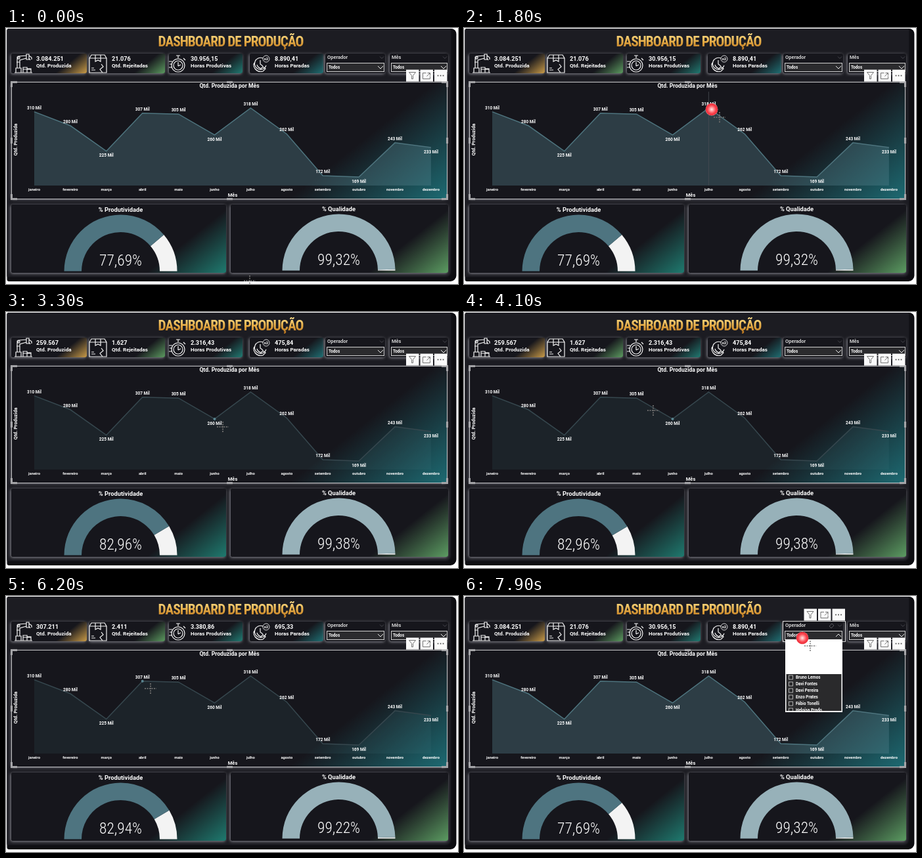
Recreate the animation shown at these times as an HTML page with a canvas. Size 688 by 390 pixels, loop 8000 ms.

```html
<!DOCTYPE html>
<html lang="pt">
<head>
<meta charset="utf-8">
<title>Dashboard de Produção</title>
<style>
html, body { margin: 0; width: 100%; height: 100%; overflow: hidden; background: #fff; }
canvas { display: block; width: 688px; height: 390px; }
</style>
</head>
<body>
<canvas id="stage"></canvas>
<script>
const canvas = document.getElementById('stage');
const g = canvas.getContext('2d');
const dpr = window.devicePixelRatio || 1;
canvas.width = 688 * dpr;
canvas.height = 390 * dpr;

const LOOP = 8000;
const SANS = 'Roboto, sans-serif';
const NARROW = '"Roboto Condensed", "Liberation Sans Narrow", "Open Sans Condensed", Roboto, sans-serif';
const MONTHS = ['janeiro', 'fevereiro', 'março', 'abril', 'maio', 'junho', 'julho',
  'agosto', 'setembro', 'outubro', 'novembro', 'dezembro'];
const VALUES = [310, 280, 225, 307, 305, 260, 318, 262, 172, 169, 243, 233];
const BELOW = [2, 5, 9, 11];
const PEOPLE = ['Bruno Lemos', 'Davi Fontes', 'Davi Pereira', 'Enzo Prates', 'Fábio Tonelli', 'Heloísa Prado'];
const px = i => 43 + 54.9 * i;
const py = i => 122 + (318 - VALUES[i]) * 0.705;

// click time, selected month, four indicators, two percentages
const TOTAL = ['3.084.251', '21.076', '30.956,15', '8.890,41', 77.69, 99.32];
const STATES = [
  [-1000, -1, ...TOTAL],
  [1780, 6, '317.987', '2.315', '3.266,55', '847,22', 79.41, 99.28],
  [2800, 5, '259.567', '1.627', '2.316,43', '475,84', 82.96, 99.38],
  [4600, 4, '305.410', '1.592', '2.945,60', '519,13', 85.02, 99.48],
  [5500, 3, '307.211', '2.411', '3.380,86', '695,33', 82.94, 99.22],
  [6700, -1, ...TOTAL]
];
const OPEN = 7880;
const CLICKS = [...STATES.slice(1).map(s => s[0]), OPEN];

// time, x, y of the crosshair
const PATH = [
  [0, 371, 385], [900, 396, 214], [1700, 389, 136], [1950, 389, 136], [2400, 346, 171],
  [2750, 330, 175], [3600, 330, 175], [4100, 288, 150], [4400, 275, 143], [4750, 275, 143],
  [5200, 227, 145], [5450, 220, 141], [6200, 220, 141], [6700, 242, 121], [6950, 242, 121],
  [7750, 527, 76], [8000, 527, 76]
];
const smooth = k => k * k * (3 - 2 * k);
const clamp = k => Math.max(0, Math.min(1, k));

function cursorAt(t) {
  const n = Math.max(1, PATH.findIndex(p => p[0] > t));
  const [a, b] = [PATH[n - 1], PATH[n]];
  const k = smooth((t - a[0]) / (b[0] - a[0]));
  return [a[1] + (b[1] - a[1]) * k, a[2] + (b[2] - a[2]) * k];
}

function text(s, x, y, size, align = 'left', color = '#fff', weight = 700, family = SANS) {
  g.font = `${weight} ${size}px ${family}`;
  g.textAlign = align;
  g.textBaseline = 'middle';
  g.fillStyle = color;
  g.fillText(s, x, y);
}

function line(d, color = '#fff', width = 1) {
  g.strokeStyle = color;
  g.lineWidth = width;
  g.stroke(new Path2D(d));
}

function rect(x, y, w, h, color) {
  g.fillStyle = color;
  g.fillRect(x, y, w, h);
}

function frame(x, y, w, h, color, width = 1) {
  g.strokeStyle = color;
  g.lineWidth = width;
  g.strokeRect(x, y, w, h);
}

function rounded(x, y, w, h, radii, color) {
  g.beginPath();
  g.roundRect(x, y, w, h, radii);
  g.fillStyle = color;
  g.fill();
}

// dark panel with a soft grey rim and a tint in its lower right corner
function panel(x, y, w, h, tint, reach) {
  g.save();
  g.shadowColor = '#8b8b93';
  g.shadowBlur = 4 * dpr;
  g.shadowOffsetX = -dpr;
  g.shadowOffsetY = dpr;
  rounded(x, y, w, h, 3, '#16161c');
  g.restore();
  if (!tint) return;
  const r = x + w, b = y + h;
  const fill = g.createLinearGradient(r - reach * 0.62, b - reach * 0.78, r, b);
  fill.addColorStop(0, '#16161c');
  fill.addColorStop(1, tint);
  g.fillStyle = fill;
  g.fill();
}

const ICONS = [
  'M13 68H40M15 68V61H23V68M17 61V47L20 43L31 42M21 61V49L31 46M31 40V48H35V40ZM35 42L39 45V48M35 46L37 49M26 68V60H32V68M32 68V62H38V68M26 63H38M16 52H21M17 45A2 2 0 1 0 21 45A2 2 0 1 0 17 45',
  'M127 46L130 41H150L153 46V68H127ZM127 46H153M136 41V51L140 49L144 51V41M130 64H136M130 61H134M147 68L143 63L148 59L145 55',
  'M252 57A10 10 0 1 0 272 57A10 10 0 1 0 252 57M255 57A7 7 0 1 0 269 57A7 7 0 1 0 255 57M262 58V52M262 58L266 56M259 42H265M262 42V46M270 46L273 49M248 51H253M249 55H252M248 60H253',
  'M391 46A9 9 0 1 0 396 57M387 49V55L391 58M379 52Q375 56 379 62Q384 68 391 66L395 62L391 59L388 62Q383 60 382 56'
];

function header() {
  const name = 'DASHBOARD DE PRODUÇÃO';
  const gold = g.createLinearGradient(0, 10, 0, 32);
  gold.addColorStop(0, '#f9d983');
  gold.addColorStop(0.5, '#e5ab45');
  gold.addColorStop(1, '#b8741f');
  g.save();
  g.letterSpacing = '-1px';
  g.font = `700 28px ${NARROW}`;
  const size = Math.min(28, 28 * 226 / g.measureText(name).width);
  text(name, 342, 21.5, size, 'center', gold, 700, NARROW);
  g.restore();
}

function cards(data) {
  const left = [8, 127, 248, 371], labels = ['Qtd. Produzida', 'Qtd. Rejeitadas', 'Horas Produtivas', 'Horas Paradas'];
  const tints = ['#c99b48', '#5c9a60', '#217a72', '#1f6f73'];
  const textX = [46, 161, 281, 409];
  left.forEach((x, i) => {
    panel(x, 39, i > 1 ? 112 : 115, 30, tints[i], 30);
    line(ICONS[i], '#f4f4f4', 1.2);
    text(data[i], textX[i], 47.5, 9.1);
    text(labels[i], textX[i], 58, 8);
  });
  text('x2', 396, 47, 6, 'center');
  g.beginPath();
  g.arc(396, 47, 5, 0, 7);
  g.strokeStyle = '#fff';
  g.lineWidth = 0.8;
  g.stroke();
}

function slicer(x, w, label, open) {
  panel(x - 2, 39, w + 3, 30);
  text(label, x + 1, 45, 7.5, 'left', '#eee', 500);
  line(`M${x + w - 7} 43.5l3 3l3 -3`, '#55555c', 0.8);
  rect(x + 1, 53, w - 1, 13, '#2b2b2e');
  frame(x + 0.5, 53.5, w - 1, 13, '#cfcfcf');
  text('Todos', x + 3, 60, 6.3);
  const c = x + w - 10;
  line(open ? `M${c} 62l4 -4l4 4` : `M${c} 58l4 4l4 -4`, '#eee');
}

function tools(x, y) {
  [0, 21.5, 43].forEach(d => rect(x + d - 9.5, y - 9, 19.5, 18, '#fafafa'));
  line(`M${x - 5} ${y - 5}h10l-4 5v5h-2v-5z`, '#666', 0.9);
  line(`M${x + 21} ${y - 4}h-5v9h11v-4M${x + 23} ${y - 4}h4v4M${x + 27} ${y - 4}l-5 5`, '#666', 0.9);
  [-4, 0, 4].forEach(d => rect(x + 43 + d - 0.8, y - 0.8, 1.7, 1.7, '#444'));
}

function chart(selected, pointer) {
  panel(9, 83, 662, 177, '#1d6a72', 150);
  const dim = selected >= 0;
  const curve = VALUES.map((v, i) => `${i ? 'L' : 'M'}${px(i)} ${py(i)}`).join('');
  g.fillStyle = dim ? 'rgba(75,125,135,.13)' : 'rgba(88,130,142,.36)';
  g.fill(new Path2D(`${curve}V240H43Z`));
  line(curve, dim ? '#36474e' : '#4e747e', 1.5);

  const near = Math.round((pointer[0] - 43) / 54.9);
  if (!dim && pointer[1] > 97 && pointer[1] < 240 && Math.abs(pointer[0] - px(near)) < 15)
    line(`M${px(near)} 97V240`, '#4a4d54', 0.8);
  if (dim) {
    g.beginPath();
    g.arc(px(selected), py(selected), 2, 0, 7);
    g.fillStyle = '#5a8590';
    g.fill();
  }
  VALUES.forEach((v, i) => {
    text(v + ' Mil', px(i), py(i) + (BELOW.includes(i) ? 7 : -6), 6.5, 'center');
    text(MONTHS[i], px(i), 246.5, 5.8, 'center');
  });
  text('Qtd. Produzida por Mês', 340, 88, 8.6, 'center');
  text('Mês', 345, 254.5, 7.5, 'center');
  g.save();
  g.translate(15, 170);
  g.rotate(-Math.PI / 2);
  text('Qtd. Produzida', 0, 0, 7.3, 'center');
  g.restore();

  frame(8.5, 82.5, 663, 178, '#c4c4c6');
  line('M8.5 90V82.5H17M663 82.5H671.5V90M671.5 253V260.5H663M17 260.5H8.5V253M336 82.5H345M336 260.5H345M8.5 167V176M671.5 167V176', '#a5a5a8', 3);
}

function gauge(x, w, cx, cy, label, color, tint, share, value) {
  panel(x, 269, w, 104, tint, 76);
  text(label, cx, cy - 93.5, 9.3, 'center');
  const turn = Math.PI * (1 + share / 100);
  const arc = (from, to, fill) => {
    g.beginPath();
    g.arc(cx, cy, 86, from, to);
    g.arc(cx, cy, 59.5, to, from, true);
    g.fillStyle = fill;
    g.fill();
  };
  arc(turn, 2 * Math.PI, '#f3f3f3');
  arc(Math.PI, turn, color);
  const s = value.toFixed(2).replace('.', ',') + '%';
  g.font = `300 25px ${NARROW}`;
  const size = Math.min(25, 25 * 65 / g.measureText(s).width);
  text(s, cx, cy - 15.5, size, 'center', '#fff', 300, NARROW);
}

function dropdown() {
  rect(489, 66, 87, 111, '#fff');
  rect(490.5, 119, 84, 56, '#2a2a2c');
  g.save();
  g.beginPath();
  g.rect(490, 119, 85, 56);
  g.clip();
  PEOPLE.forEach((name, i) => {
    const y = 124 + 10 * i;
    frame(494.5, y - 3, 6, 6, '#ccc', 0.8);
    text(name, 505, y + 0.3, 6.3);
  });
  g.restore();
}

function ball([x, y], r) {
  const fill = g.createRadialGradient(x, y, 0, x, y, r);
  fill.addColorStop(0, '#ffe9e9');
  fill.addColorStop(0.3, '#ff9da0');
  fill.addColorStop(0.65, '#fa4650');
  fill.addColorStop(0.92, '#ee2f3c');
  fill.addColorStop(1, '#f7a5a8');
  g.beginPath();
  g.arc(x, y, r, 0, 7);
  g.fillStyle = fill;
  g.fill();
}

function crosshair([x, y]) {
  g.save();
  g.globalCompositeOperation = 'difference';
  g.setLineDash([2, 1.5]);
  line(`M${x - 9} ${y}H${x + 9}M${x} ${y - 8}V${y + 8}`, '#ccc', 1);
  g.restore();
}

function backdrop() {
  rect(0, 0, 688, 390, '#fff');
  rounded(1.5, 1, 684, 385, [3, 8, 9, 3], '#0c0c10');
  g.save();
  g.clip();
  g.shadowColor = '#1c1c22';
  g.shadowBlur = 5 * dpr;
  rounded(-4, -4, 681, 383, 8, '#1c1c22');
  g.restore();
}

function draw(t) {
  const cursor = cursorAt(t);
  const pointer = cursor.map(v => v - 12);
  const latest = delay => STATES.findLastIndex(s => t >= s[0] + delay);
  const selected = STATES[latest(100)][1];
  const n = latest(200);
  const now = STATES[n], before = STATES[Math.max(0, n - 1)];
  const k = smooth(clamp((t - now[0] - 200) / 350));
  const share = i => before[i] + (now[i] - before[i]) * k;
  const open = t >= OPEN;

  g.setTransform(dpr, 0, 0, dpr, 0, 0);
  backdrop();
  header();
  cards(now.slice(2, 6));
  slicer(488, 88, 'Operador', open);
  slicer(586, 86, 'Mês');
  chart(selected, pointer);
  gauge(8, 327, 174.5, 370.5, '% Produtividade', '#4e7480', '#1f7a6f', share(6), now[6]);
  gauge(342, 331, 506.5, 369.5, '% Qualidade', '#97b1b9', '#5c9c62', share(7), now[7]);
  tools(618.5, 72.5);

  if (pointer[0] > 485 && pointer[1] < 70) {
    frame(485.5, 38.5, 95, 31, '#d5d5d5');
    line('M556 46l4 -4l3 3l-4 4z', '#66666c', 0.8);
    tools(527, 28.5);
  }
  if (open) dropdown();
  const click = CLICKS.find(c => t >= c && t < c + 300);
  if (click !== undefined) ball(pointer, 9 + 2.5 * clamp((t - click) / 120));
  crosshair(cursor);
}

const start = performance.now();
function tick() {
  draw((performance.now() - start) % LOOP);
  requestAnimationFrame(tick);
}
tick();
</script>
</body>
</html>
```
